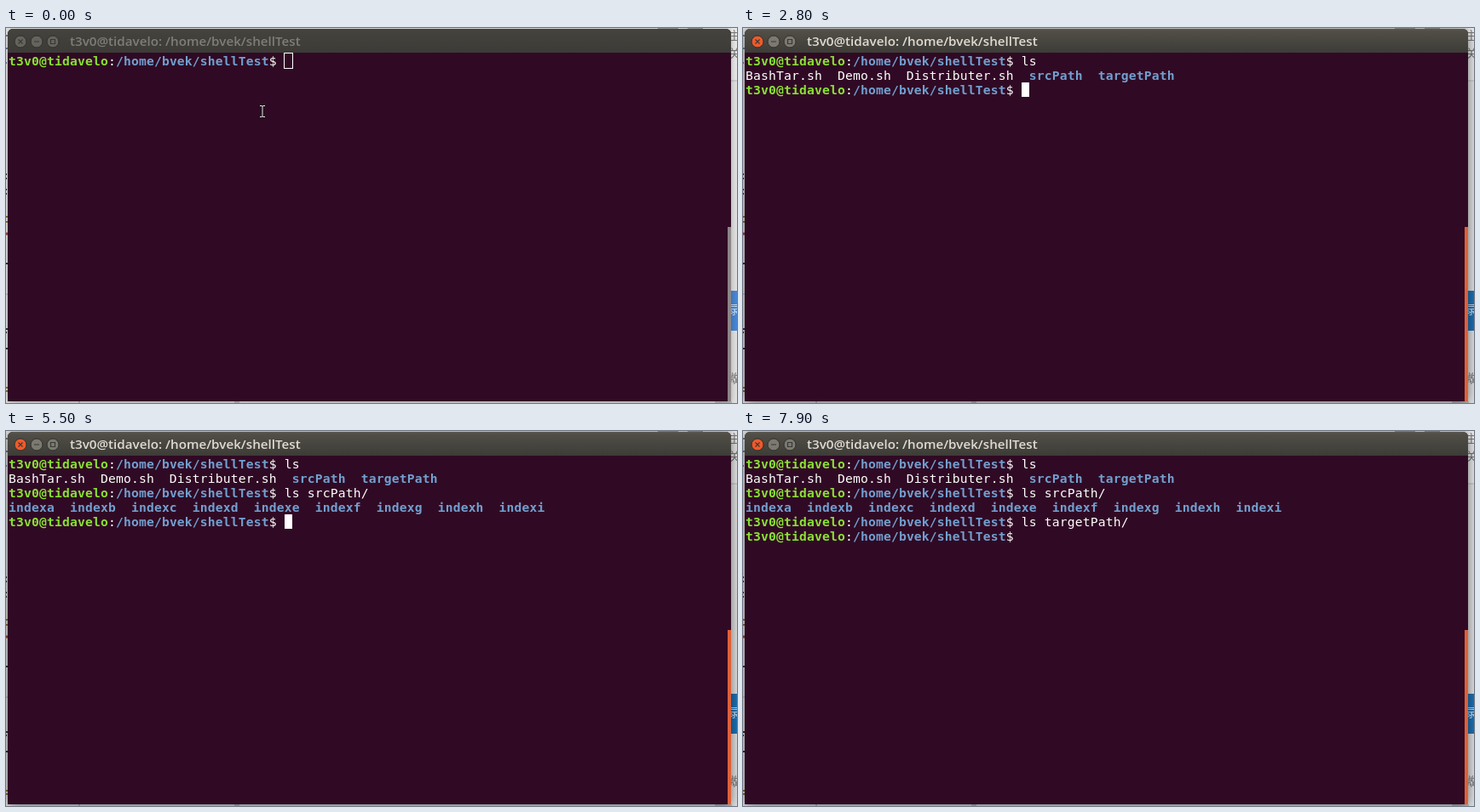
An HTML page that plays this animation: 858 px wide and 441 px high, repeating every 8 s.

```html
<!DOCTYPE html>
<html lang="en">
<head>
<meta charset="utf-8">
<title>Terminal session</title>
<style>
html, body { margin: 0; width: 100%; height: 100%; overflow: hidden; }
#stage { position: relative; width: 858px; height: 441px; overflow: hidden; background: #e4e4e4; }
#stage * { position: absolute; box-sizing: border-box; }
#desk, #desk svg { inset: 0; }
#desk text { font: 14px "Noto Sans CJK SC", "Noto Sans CJK", sans-serif; fill: #777; }
#block { fill: #4888d6; }
.active #block { fill: #1d74b8; }

#window { left: 2px; top: 1px; width: 849px; height: 438px; background: #300a24;
  border-radius: 6px 6px 0 0; box-shadow: 0 2px 9px rgba(0, 0, 0, .3); }
.active #window { box-shadow: 0 2px 14px rgba(0, 0, 0, .55); }
#bar { inset: 0 0 auto; height: 28px; border-radius: 6px 6px 0 0;
  background: linear-gradient(#44433e, #3c3b37); }
.active #bar { background: linear-gradient(#5a5850, #504e46 10%, #3d3c37); }
#bar b { left: 73px; top: 4px; line-height: 21px; white-space: pre; color: #807d78;
  font: 600 15.2px/21px "Open Sans", "Noto Sans", sans-serif; }
.active #bar b { color: #dfdbd2; }
#bar svg { left: 0; top: 0; }
#bar circle { fill: #65635c; stroke: #302f2b; }
#bar path { fill: none; stroke: #393834; stroke-width: 1.2; }
.active #bar circle { fill: #7b7970; }
.active #bar .close { fill: #ef5a2b; }
#scroll { left: 845px; top: 233px; width: 4px; height: 205px; background: #8d8587; }
.active #scroll { background: #df6038; }

#term { inset: 0; color: #fff; font: 14.667px/17px "DejaVu Sans Mono", monospace; letter-spacing: .17px; }
#term div { left: 3px; height: 17px; white-space: pre; }
#term span { position: static; font-weight: bold; }
.user { color: #8ae234; }
.dir { color: #729fcf; }
#caret { width: 9px; height: 17px; background: #fff; }
#caret.hollow { left: 326px !important; width: 11px; height: 19px; margin-top: -1px;
  background: none; border: 1px solid #fff; }
#mouse { width: 9px; height: 17px; }
#mouse path { fill: none; }
</style>
</head>
<body>
<div id="stage">
  <div id="desk">
    <svg width="858" height="441">
      <path d="M851 0h7v62h-7z" fill="#ebebeb"/>
      <path d="M851 62h7" stroke="#bbb"/>
      <path d="M0 313h2" stroke="#aaa"/>
      <path d="M0 9h2M0 24h2M0 41h1" stroke="#6d7b91" stroke-width="2"/>
      <path d="M0 172h1M0 177h1M0 190h1M0 195h1M0 277h2M0 354h2M0 358h1M0 377h2" stroke="#333" stroke-width="2"/>
      <path d="M0 222h2M0 228h2M0 423h2M0 427h2" stroke="#8a7434" stroke-width="2"/>
      <path d="M0 242h2" stroke="#a23c35" stroke-width="3"/>
      <path d="M765 .5h24M800 .5h18M85 440h2M268 440h6M832 440h20" stroke="#999"/>
      <text x="846" y="14">注</text>
      <text x="848" y="35">关</text>
      <path id="block" d="M851 309h7v47h-7z"/>
      <text x="848" y="336" style="fill:#cfe2f5">录</text>
      <text x="846" y="417">微</text>
    </svg>
  </div>
  <div id="window">
    <div id="bar">
      <svg width="70" height="28">
        <circle class="close" cx="15" cy="15" r="7"/>
        <circle cx="34" cy="15" r="7"/>
        <circle cx="53" cy="15" r="7"/>
        <path d="M12.5 12.5l5 5m0-5l-5 5M31 15h6M50.5 12.5h5v5h-5z"/>
      </svg>
      <b id="title"></b>
    </div>
    <div id="scroll"></div>
  </div>
  <div id="term"></div>
  <div id="caret"></div>
  <svg id="mouse" viewBox="0 0 9 17">
    <path d="M1.5 1.5H6.5M4 1.5V14.5M1.5 14.5H6.5" stroke="#111" stroke-width="2.6"/>
    <path d="M1 1.5H3.4L4 2.2L4.6 1.5H7M4 2V14M1 14.5H3.4L4 13.8L4.6 14.5H7" stroke="#eee"/>
  </svg>
</div>
<script>
const LOOP = 8000, CELL = 9, ROW = 17, LEFT = 3, TOP = 30;
const $ = id => document.getElementById(id);
const user = "t3v0@tidavelo", path = "/home/bvek/shellTest";
const promptCells = user.length + path.length + 3;
const dir = s => `<span class="dir">${s}</span>`;
const prompt = `<span class="user">${user}</span>:${dir(path)}$ `;

// Output rows that sit between the prompts
const listing = "BashTar.sh  Demo.sh  Distributer.sh  " + dir("srcPath  targetPath");
const indexes = dir([..."abcdefghi"].map(c => "index" + c).join("  "));

// Each prompt: row, time shown, then [time, text] as it is typed
const prompts = [
  { row: 0, at: 0, typed: [[2800, "ls"]] },
  { row: 2, at: 2800, typed: [[3700, "l"], [3900, "ls"], [4000, "ls "], [4200, "ls s"],
    [4600, "ls sr"], [4900, "ls srcPath/"]] },
  { row: 4, at: 5500, typed: [[6300, "l"], [6500, "ls "], [6700, "ls t"], [6900, "ls targetPath/"]] },
  { row: 5, at: 7300, typed: [] }
];
const outputs = [{ row: 1, at: 2800, html: listing }, { row: 3, at: 5500, html: indexes }];
const blinks = [[2300, 2800], [3300, 3700], [5400, 5500], [6100, 6300], [7900, 8000]];

function addRow(item) {
  item.el = document.createElement("div");
  item.el.style.top = TOP + item.row * ROW + "px";
  $("term").append(item.el);
}
[...prompts, ...outputs].forEach(addRow);
outputs.forEach(o => o.el.innerHTML = o.html);
for (const p of prompts) {
  p.el.innerHTML = prompt;
  p.input = document.createTextNode("");
  p.el.append(p.input);
}
$("title").textContent = `${user}: ${path}`;

function place(el, x, y) {
  el.style.left = x + "px";
  el.style.top = y + "px";
}
const show = (el, on) => el.style.visibility = on ? "visible" : "hidden";

function draw(t) {
  const active = t >= 1700;
  $("stage").classList.toggle("active", active);
  $("caret").classList.toggle("hollow", !active);
  [...prompts, ...outputs].forEach(item => show(item.el, t >= item.at));

  let current;
  for (const p of prompts) {
    const step = p.typed.filter(s => t >= s[0]).pop();
    p.input.data = step ? step[1] : "";
    if (t >= p.at) current = p;
  }
  place($("caret"), LEFT + (promptCells - 1 + 1 + current.input.length - 1 + 1) * CELL - 0, TOP + current.row * ROW);
  show($("caret"), !blinks.some(([from, to]) => t >= from && t < to));

  const moved = t >= 1500;
  place($("mouse"), moved ? 303 : 297, moved ? 94 : 90);
  show($("mouse"), t < 2400);
}

const start = performance.now();
function tick() {
  draw((performance.now() - start) % LOOP);
  requestAnimationFrame(tick);
}
draw(0);
requestAnimationFrame(tick);
</script>
</body>
</html>
```
